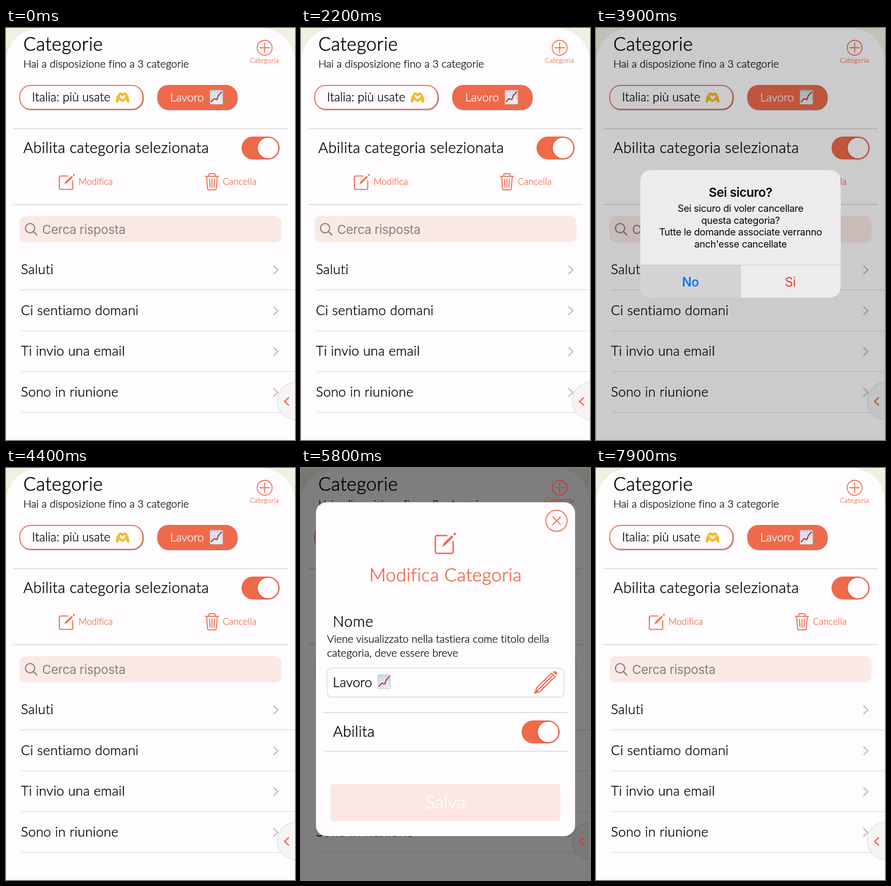
An HTML page for the animation above (8000 ms loop, 600x854 px).

```html
<!DOCTYPE html>
<html lang="it">
<head>
<meta charset="utf-8">
<title>Categorie</title>
<style>
html, body { margin: 0; width: 100%; height: 100%; overflow: hidden; background: #f0f0e1 }
svg { display: block; width: 100%; height: 100%; color: #ef6a4b }
text { font-family: Lato, "Open Sans", sans-serif; font-weight: 300; font-variant-ligatures: none; stroke-width: .018em }
.ui { font-family: Inter, Roboto, sans-serif; font-weight: 400; letter-spacing: -.017em; stroke: none }
.bold { font-weight: 600; letter-spacing: -.02em }
.mid { text-anchor: middle }
.line { fill: none; stroke: currentColor; stroke-linecap: round; stroke-linejoin: round }
.rule { stroke: #d3d1d5; stroke-width: 1.6 }
.thin { stroke: #dddbdf; stroke-width: 1.3 }
.chip { filter: drop-shadow(1.5px 1.5px .7px rgba(0, 0, 0, .45)) }
.knob { filter: drop-shadow(0 2px 3px rgba(0, 0, 0, .15)) }
.dimmed { color: #bd4a31 }
#alert { transform-origin: 300px 427px }
</style>
</head>
<body>
<svg id="stage" viewBox="0 0 600 854"></svg>
<script>
const ORANGE = 'currentColor';
const INK = '#050406';

const text = (x, y, size, str, spacing = 0, fill = INK, cls = '') =>
  `<text x="${x}" y="${y}" font-size="${size}" fill="${fill}" stroke="${fill}" class="${cls}"` +
  ` letter-spacing="${spacing}em">${str}</text>`;
const rect = (x, y, w, h, r, fill, more = '') =>
  `<rect x="${x}" y="${y}" width="${w}" height="${h}" rx="${r}" fill="${fill}" ${more}/>`;
const line = (d, width, more = '') => `<path class="line" d="${d}" stroke-width="${width}" ${more}/>`;
const rule = (x1, x2, y, cls = 'rule') => `<path class="${cls}" d="M${x1} ${y}H${x2}"/>`;
const use = (id, x = 0, y = 0, more = '') => `<use href="#${id}" transform="translate(${x} ${y}) ${more}"/>`;

const defs = `<defs>
  <linearGradient id="paper" x2="0" y2="1">
    <stop stop-color="#c5d3dd"/><stop offset="1" stop-color="#e9eff2"/>
  </linearGradient>
  <g id="add">
    <circle class="line" cx="537" cy="41" r="15.5" stroke-width="1.8"/>
    ${line('M527 41H547M537 31V51', 1.8)}
    ${text(536.5, 72, 14, 'Categoria', .02, ORANGE, 'mid')}
  </g>
  <g id="back">${line('M586.5 766.5L578.5 774L586.5 781.5', 2.8)}</g>
  <g id="switch">
    ${rect(489, 225, 79, 47.5, 23.7, ORANGE)}
    <circle class="knob" cx="544" cy="248.7" r="21.3" fill="#fefcff"/>
  </g>
  <g id="edit">
    ${line('M303 140H283q-4 0-4 4V173q0 4 4 4H312q4 0 4-4V153', 2.9)}
    <path d="M293 163.5l3-7.5 17-16.5 3.5 3.5-17 16.5z" fill="currentColor"/>
    ${line('M318.5 137.5l1.5-1.5', 4)}
  </g>
  <g id="chart">
    ${rect(423.5, 129, 26.5, 29, 1, 'url(#paper)', 'stroke="#b4c3cd" stroke-width=".8"')}
    <path d="M430 130V157M436.5 130V157M443 130V157M424 136H450M424 143H450M424 150H450" stroke="#f3f7f9" stroke-width=".7"/>
    ${line('M426 153L432 146.5L437.5 148.5L441.5 139L447.5 133', 2.3, 'style="color:#c4262b"')}
  </g>
  <g id="hands" style="color:#f4bd2c">
    ${line('M231 143L229.5 152M251 143L252.5 152', 5.5)}
    ${line('M241 151C234 147 231 142 234 137.5Q238 134 241 139.5Q244 134 248 137.5C251 142 248 147 241 151', 4.6)}
    ${line('M231 147l3 4M251 147l-3 4M236 135l3 4M246 135l-3 4', .9, 'style="color:#c4831b"')}
  </g>
</defs>`;

const rows = ['Saluti', 'Ci sentiamo domani', 'Ti invio una email', 'Sono in riunione'].map((label, i) => {
  const y = 501 + i * 84.6;
  return text(31, y + 9, 28, label, .012) +
    line(`M556 ${y - 7.5}L564.5 ${y + .5}L556 ${y + 8.5}`, 2.8, 'style="color:#c3c1c5"') +
    rule(31, 600, y + 42, 'thin');
}).join('');

const page = `
  <path d="M0 854V68A68 68 0 0 1 68 0H532A68 68 0 0 1 600 68V854Z" fill="#fefcff" stroke="#e3e2d6"/>
  ${text(36, 47, 38.5, 'Categorie', .013)}
  ${text(36, 82, 22, 'Hai a disposizione fino a 3 categorie', .003)}
  ${use('add')}
  ${rect(28.5, 119, 255.5, 49.5, 22.5, '#fefcff', 'class="chip" stroke="currentColor" stroke-width="2"')}
  ${text(54, 152, 25, 'Italia: più usate', .005)}
  ${use('hands', 1)}
  ${rect(314, 118, 166, 51.5, 23, ORANGE, 'class="chip"')}
  ${text(341, 152, 24, 'Lavoro', 0, '#fff')}
  ${use('chart')}
  ${rule(15, 585, 208.7)}
  ${text(36, 259, 31, 'Abilita categoria selezionata', .017)}
  ${use('switch')}
  ${use('edit', -98.5, 201.75, 'scale(.75)')}
  ${text(150.5, 324.5, 19, 'Modifica', 0, ORANGE)}
  ${line('M414 307.5H441.5M421 307V304q0-2 2-2H432q2 0 2 2V307M416.5 308L418.5 333q0 2.5 2.5 2.5H434q2.5 0 2.5-2.5L438.7 308M422.5 313.5L423.5 330M427.6 313.5V330M432.7 313.5L431.7 330', 2)}
  ${text(450, 324.5, 19, 'Cancella', .01, ORANGE)}
  ${rule(15, 585, 365.7)}
  ${rect(28, 390, 544, 54.5, 13, '#fbe9e6')}
  <g style="color:#88807f">
    <circle class="line" cx="50" cy="415" r="9.6" stroke-width="2.3"/>
    ${line('M57 422L64 429', 2.6)}
  </g>
  ${text(75, 427, 26, 'Cerca risposta', 0, '#88807f', 'ui')}
  ${rows}
  <circle cx="602" cy="773" r="39" fill="#f5f3f4" stroke="#dfdddf" stroke-width="1.5"/>
  ${use('back')}`;

const dim = alpha => `<path d="M0 0H600V854H0Z" opacity="${alpha}"/>`;

const modal = (id, title, field) => `<g id="${id}">
  ${dim(.5)}
  <g class="dimmed">${use('add')}${use('back')}</g>
  ${rect(31, 71, 538, 692, 22, '#fefcff')}
  <circle class="line" cx="530.5" cy="109.5" r="22" stroke-width="2"/>
  ${line('M522.5 101.5l16 16m0-16l-16 16', 2)}
  ${use('edit')}
  ${text(300, 235, 38, title, .01, ORANGE, 'mid')}
  ${text(66, 329, 31, 'Nome', .025)}
  ${text(54, 361.5, 22, 'Viene visualizzato nella tastiera come titolo della', .005)}
  ${text(54, 390.5, 22, 'categoria, deve essere breve', .007)}
  ${rect(54.5, 414.5, 491.5, 60.5, 10, 'none', 'stroke="#d9d7db" stroke-width="1.3"')}
  ${field}
  ${line('M485.5 466.5L489 456L520 425.5L527.5 432.5L496 463.5ZM491 461L523 429.5', 2.3)}
  <path d="M484 468l4-10 6.5 6.5zM523 422.5q4-3 7.5 0 2.5 3.5-.5 7z" fill="currentColor"/>
  ${rule(46, 553.5, 507)}
  ${text(66.5, 557, 31, 'Abilita', .015)}
  ${use('switch', -31, 298.3)}
  ${rule(46, 553.5, 587)}
  ${rect(61.5, 655.5, 477, 76.5, 6, '#fce7e2')}
  ${text(300, 706, 38, 'Salva', 0, '#fff', 'mid')}
</g>`;

const message = ['Sei sicuro di voler cancellare', 'questa categoria?',
  'Tutte le domande associate verranno', "anch'esse cancellate"]
  .map((str, i) => text(300, 381 + i * 24.6, 20, str, 0, INK, 'ui mid')).join('');

const alertBox = `<g id="shade">${dim(.2)}</g>
<g id="alert">
  ${rect(92, 294.5, 416, 264.5, 22, '#edebed')}
  <path id="press" d="M92 491.5H300V559H114A22 22 0 0 1 92 537Z" fill="#d5d3d6"/>
  <path d="M92 491.5H508M300 491.5V559" stroke="#c9c7ca" stroke-width="1"/>
  ${text(300, 350, 26, 'Sei sicuro?', 0, INK, 'ui bold mid')}
  ${message}
  ${text(196, 535.5, 26.5, 'No', 0, '#0a7aff', 'ui bold mid')}
  ${text(403.5, 535.5, 26.5, 'Si', 0, '#e5402f', 'ui mid')}
</g>`;

const $ = id => document.getElementById(id);
$('stage').innerHTML = defs + page +
  modal('create', 'Nuova Categoria', text(66, 453.5, 28, 'Nome della Categoria', .02, '#c6c4c8')) +
  modal('modify', 'Modifica Categoria', text(66, 453.5, 28, 'Lavoro') + use('chart', -264, 299.5)) +
  alertBox;

const STEP = 100, LOOP = 8000;
const ramp = (t, from, to) => {
  const p = Math.min(1, Math.max(0, (t - from + STEP) / (to - from + STEP)));
  return p * p * (3 - 2 * p);
};
const fade = (id, alpha) => {
  $(id).style.opacity = alpha;
  $(id).style.display = alpha > 0 ? '' : 'none';
};

function draw(now) {
  const t = Math.floor(now % LOOP / STEP) * STEP;
  fade('create', ramp(t, 500, 1000) - ramp(t, 1600, 2200));
  fade('modify', ramp(t, 5300, 5800) - ramp(t, 7400, 7900));

  const opening = ramp(t, 2800, 3300);
  const shown = opening - ramp(t, 4000, 4400);
  fade('shade', shown);
  fade('alert', shown);
  $('alert').style.transform = `scale(${1.12 - .12 * opening})`;
  fade('press', t >= 3900 ? 1 : 0);
  requestAnimationFrame(draw);
}
draw(performance.now());
</script>
</body>
</html>
```
